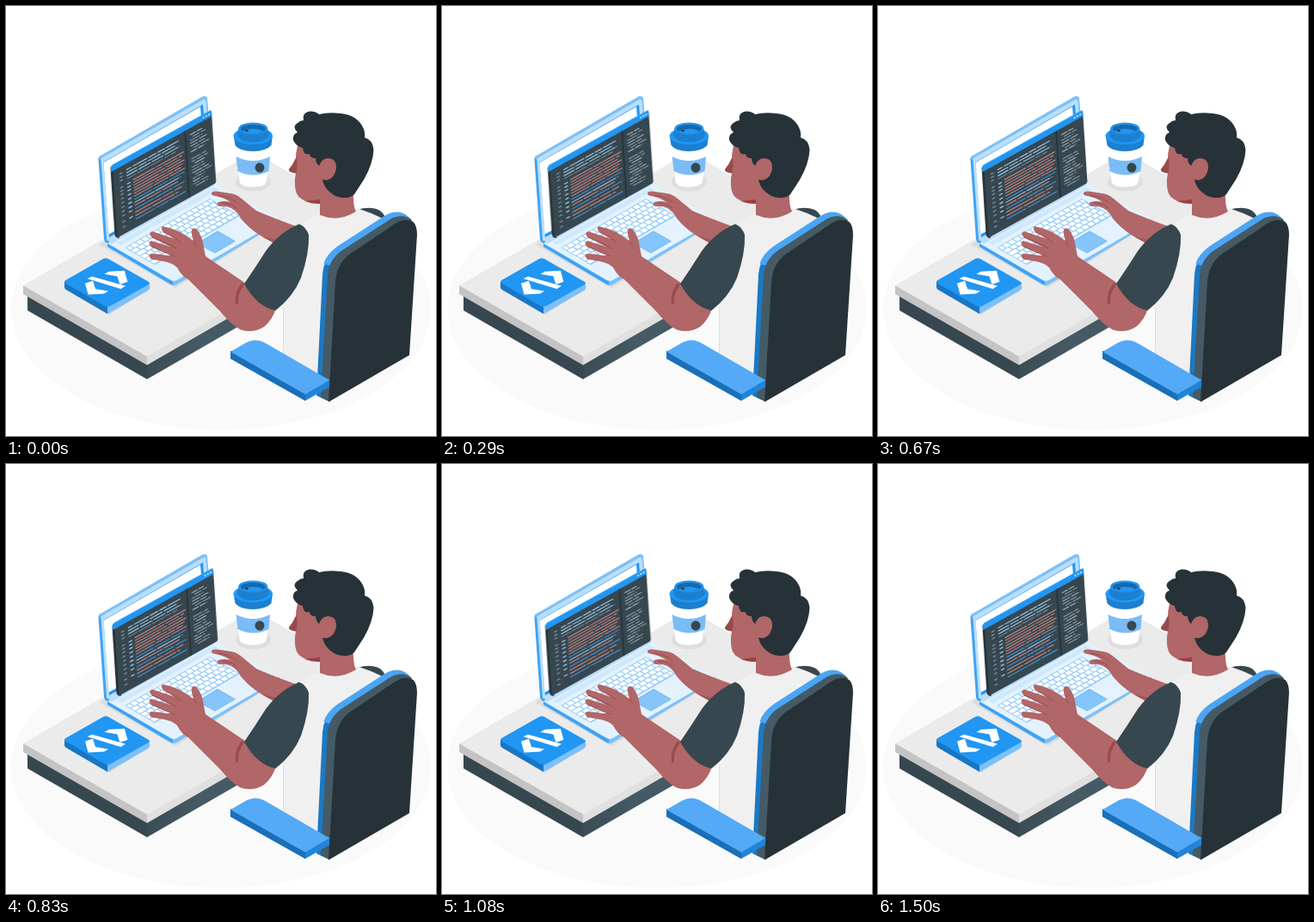
These frames come from a looping animation (500x500 px, 1540 ms). An HTML page:

```html
<!DOCTYPE html>
<html lang="en">
<head>
<meta charset="utf-8">
<title>Programmer at a desk</title>
<style>
  html, body { margin: 0; width: 100%; height: 100%; overflow: hidden; background: #fff; }
  svg { display: block; width: 100vw; height: 100vh; }
  .blue { fill: #2196f3; }
  .skin { fill: #b16668; }
  .dark { fill: #263238; }
  .slate { fill: #37474f; }
  .shade { fill: none; stroke: #9a4a4d; stroke-width: .9; stroke-linecap: round; }
</style>
</head>
<body>
<svg viewBox="0 0 500 500">
  <defs>
    <linearGradient id="leg">
      <stop offset="0" stop-color="#3b4c54"/>
      <stop offset=".4" stop-color="#455a64"/>
    </linearGradient>
  </defs>

  <ellipse cx="250" cy="352" rx="244" ry="141" fill="#fafafa"/>

  <g id="desk">
    <path class="slate" d="M25 336V354L164 434V416Z"/>
    <path fill="url(#leg)" d="M164 416V434L320 344V326Z"/>
    <path fill="#ebebeb" d="M20 325 288 169.500 400 235V272L164 408Z"/>
    <path fill="#c4c4c4" d="M20 325V335L164 417.500V407.500Z"/>
    <path fill="#e0e0e0" d="M164 407.500V417.500L345 313V303Z"/>
  </g>

  <g id="tile">
    <path fill="#d9d9d9" d="M66 326 116 297 169 327 120 359Z"/>
    <path fill="#1976c4" d="M68 320V327Q68 329 70 330L118 358V348Z"/>
    <path fill="#7dc0f9" d="M118 348V358L165 331Q167 330 167 328V321Z"/>
    <path class="blue" d="M69 319 113 294Q116 292.500 119 294L165.500 320.500Q168 322 165.500 324L121 349Q118 350.500 115 349L69.500 322.500Q67 321 69 319Z"/>
    <g fill="#fff">
      <path id="chev" d="M92 322.500 101 319.500 104 329 119 331.500 114 334.500 95.500 335.500Z"/>
      <use href="#chev" transform="rotate(180 116.700 321.600)"/>
      <path d="M94.500 317 100 314.500 139 325.500 133.500 329Z"/>
    </g>
  </g>

  <g id="cup">
    <ellipse cx="287.500" cy="204.500" rx="20.500" ry="11" fill="#dedede"/>
    <path fill="#fff" d="M267 160 271.500 204Q273 210.500 287 210.500T303 204L307.500 160Z"/>
    <path fill="#7abcf7" d="M267.500 175Q287 185 307 175L305.500 192Q288 201 269.500 192Z"/>
    <ellipse class="slate" cx="295" cy="188" rx="5.500" ry="5.800"/>
    <path fill="#1c7fd0" d="M264.500 150 266.500 162Q272 169 287 169T308.500 162L310 150Z"/>
    <ellipse class="blue" cx="287.300" cy="151" rx="22.700" ry="10"/>
    <path fill="#1c7fd0" d="M270.500 142 269 151Q273 158.500 287 158.500T306 151L304 142Z"/>
    <ellipse class="blue" cx="287.300" cy="142.500" rx="17" ry="7"/>
    <ellipse fill="#1769ad" cx="287.300" cy="143" rx="14.500" ry="5.300"/>
    <path class="blue" d="M275 145.500Q287 140 300 145.500 294 148.500 287 148.500T275 145.500Z"/>
    <ellipse class="dark" cx="280" cy="145" rx="2" ry=".9"/>
  </g>

  <g id="laptop">
    <path fill="#dcdcdc" d="M108 277 130 265 318 252 197 328Z"/>
    <path fill="#3fa3f4" d="M118 275V280L191 323.500Q195 325.500 199 323.500V316Z"/>
    <path fill="#7cc0f8" d="M194 318V324.500Q197 325 200 323L316 253Q318 252 318 248Z"/>
    <path fill="#e3f2fd" d="M118 276 243 206 316 247.500Q318 249 316 250.500L199 318.500Q195 321 191 318.500Z"/>
    <path fill="#3fa3f4" d="M107.500 179Q107 175.500 110 174L114 178 122 272 119 275.500Q115 276 114 271Z"/>
    <path fill="#7cc0f8" d="M108 177Q108 175 110 174L228 105.500Q232 103.500 234 107L242 207 237 205 228 113 112 181Z"/>
    <path fill="#bbdefb" d="M110.500 179Q110.500 177 112.500 176L229 109Q232 107.500 232.500 111L241 206 120 273Q117.500 274 117 271Z"/>
    <path class="blue" d="M113.500 181.500 229 114.500 236 204 120 269Z"/>
    <path fill="#fff" d="M113.500 182 226 117 233 203 119.500 265.500Z"/>
    <path fill="#bbdefb" d="M119.500 272.500 238 206 243 208 122 277Z"/>
    <path fill="#cfe8fc" d="M129 275 242 210.500 247 213.500 134 278Z"/>
    <path fill="#5fb0f5" d="M246 261.500 267 273.500 243 287.500 222 276Z"/>
    <path fill="#86c5f9" d="M246 262.500 266 273.500 243 287 223 276Z"/>
    <g id="keys" transform="matrix(.866 -.5 .866 .5 140 281)">
      <rect x="-1" y="-1" width="114" height="40" rx="1" fill="#90caf9"/>
    </g>
  </g>

  <g id="win">
    <path class="dark" d="M121.500 188 125 184 132 269.500Q128 270.500 126.500 266Z"/>
    <g id="pane" transform="matrix(1 -.556 .065 .994 124 186)">
      <rect class="slate" width="115" height="84" rx="1.500"/>
      <path class="blue" d="M-2.300 2Q-2.300-1.500 1-1.500H113Q115-1.500 115 1V6H-2Z"/>
      <path fill="#64b5f6" d="M-1.500-.8Q0-1.700 1-1.700H114V-.7H0Z" opacity=".6"/>
      <path class="dark" d="M83 6H84.500V84H83Z"/>
      <g fill="#fff">
        <circle cx="105.500" cy="2.400" r=".9"/><circle cx="108.700" cy="2.400" r=".9"/><circle cx="111.900" cy="2.400" r=".9"/>
      </g>
    </g>
  </g>

  <g id="farArm">
    <path class="skin" d="M239 217.500Q240 215 245 215.500L262 218Q268 219 274 224L291 238Q312 247 337 256L320 280Q306 273 296 267 283 259 273 247 269 239 262 235 256 232 248 233 244 231 247 228 254 226 261 228 254 223 244 221 238 220 239 217.500Z"/>
    <path class="shade" d="M247 220Q260 222 268 228M251 229Q262 230 268 235"/>
    <path fill="#9a4a4d" opacity=".6" d="M296 267Q306 273 320 280L324 274Q308 271 296 267Z"/>
  </g>

  <g id="body">
    <path class="slate" d="M408 237Q424 232 435 238 442 243 444 256L420 262Z"/>
    <path fill="#f0f0f0" d="M365 241Q352 248 341 254L322 352V420L365 450 440 300V248Q424 240 408 235Q388 252 365 241Z"/>
    <path fill="none" stroke="#dedede" d="M322.500 350V406"/>
    <path class="skin" d="M365 222V243Q386 252 407 239 403 232 404 212Z"/>
    <path class="skin" d="M342 155Q337 166 337 177 334 184 329 190 328 193 337 194.500 335 204 336.500 213 338 224 350 227 361 229 370 225L392 210 390 160Z"/>
    <path fill="#9a3f43" d="M346 226.500Q357 230.500 365 230V224.500Q357 226.500 346 226.500Z"/>
    <path fill="#9a4a4d" d="M337.500 176Q334 184 329 190 328 193 337 194.500 340 186 337.500 176Z"/>
    <path class="dark" d="M346 133Q344 124 353 122.500 360 122 364 126 374 123 390 125 408 127 415 141Q418 147 417 153 426 155 427.500 167 427 183 416 202L405 219Q399 225 386 222 371 216 368 202L384 190 378 178 366 187Q360 184 360 177 353 177 353 172 346 174 345 165 337 163 334 156 333 149 339 147 332 140 339 136 342 133 346 133Z"/>
    <path class="skin" d="M364 188Q365 178 374 177 384 177 384 188 383 200 373 202.500 365 203 364 196Z"/>
  </g>

  <g id="nearArm">
    <path class="skin" d="M232 291 278 322 314 352Q309 366 300 373 288 381 273 376.500 263 372 249 355L212 318Q204 314 199 304 194 299 184 297L169 294.500Q165 291 168 288 178 288 187 290L193 290 169 280Q164 275 169 273L191 280 169 268.500Q165 264 170 262L197 271 183 262.500Q179 259 182 256.500 187 256 203 263L218 273Q215 265 216 260 219 256 223 261 229 270 230 281Z"/>
    <path class="shade" d="M183 263Q196 269 203 275M170 269Q188 276 198 282M170 280Q184 287 196 291M218 273Q220 277 222 279"/>
    <path fill="#9a4a4d" d="M274 322Q265 333 267 347 269 348 270 345 269 334 277 324Z"/>
    <path class="slate" d="M341 253.500Q349 257 352 266 353 287 343 316 334 338 313.500 354 292 350 277 323 290 304 302 285 318 263 341 253.500Z"/>
  </g>

  <g id="chair">
    <path fill="#1c79c4" d="M361 453 368 312Q369 295 383 283L440 248 470 250 400 330 376 460Z"/>
    <path fill="#4aa5f5" d="M369.500 300Q372 289 386 279L441 243.500Q456 235 468 245L474 252 460 256 392 292 378 302Z"/>
    <path fill="#455a64" d="M366 455 374 313Q375 296 389.500 285L446 248.500Q461 240 472 249L440 300 376 460Z"/>
    <path class="dark" d="M375 460.500 383 322Q384 301 399 289L451 254Q464 245 474 251.500 478 256 478 266L469 406Z"/>
  </g>

  <g id="armrest">
    <path fill="#2184d8" d="M261 401V410L348 459 376 443V434Z"/>
    <path fill="#1a6fb8" d="M261 401V410L348 459V449Z"/>
    <path fill="#54aaf6" d="M261 402 280 391Q290 386 300 391L376 435 348 451.500Z"/>
  </g>
</svg>

<script>
const $ = id => document.getElementById(id);

function rect(parent, x, y, width, height, fill, rx = 0) {
  const r = document.createElementNS('http://www.w3.org/2000/svg', 'rect');
  for (const [k, v] of Object.entries({ x, y, width, height, fill, rx })) r.setAttribute(k, v);
  parent.append(r);
}

// Keyboard: six staggered rows, the front one with a space bar
for (let row = 0; row < 6; row++) {
  const y = row * 6.4, lead = row === 5 ? 7 : 4 + (row * 3) % 7;
  rect($('keys'), 0, y, lead, 5.2, '#fff', .6);
  for (let x = lead + 1.3; x < 112;) {
    const space = row === 5 && x > 28 && x < 36;
    const w = Math.min(space ? 40 : 6.1, 112 - x);
    if (w > 1) rect($('keys'), x, y, w, 5.2, '#fff', .6);
    x += w + 1.3;
  }
}

// Code: a line is cut into words by a seeded generator
let seed = 7;
const rnd = () => (seed = seed * 16807 % 2147483647) / 2147483647;
function line(x, end, y, color, word = 12) {
  while (x < end) {
    const w = Math.min(word * (.5 + rnd()), end - x);
    rect($('pane'), x, y, w, 1.1, color);
    x += w + 1.3;
  }
}
const pale = '#a9d3f5', red = '#d98a86', blue = '#3d9ae8', gray = '#78909c';
[12.5, 16, 19.5, 23].forEach((y, i) => line(15, 77 - i % 2 * 5, y, i < 3 ? pale : gray));
for (let i = 0; i < 7; i++) line(22, 81 - i % 3 * 2, 28 + i * 3.2, red, 26);
[[51, blue], [54.5, pale], [58, red], [62, blue], [66, red], [70, red], [74, blue]]
  .forEach(([y, c], i) => line(22, 80 - i % 3 * 4, y, c, 22));
[13, 17, 21, 29, 33, 37, 42, 47, 52, 57, 62, 69, 75].forEach((y, i) => {
  rect($('pane'), 7, y, 3.5, 1.5, gray);
  if (i > 2 && i < 12) rect($('pane'), 15, y, 4, 1.3, pale);
});
for (let i = 0; i < 18; i++) {
  const y = 13 + i * 3.3 + (i > 6 ? 5 : 0), x = 89 + (i % 4 === 1 ? 3 : 0);
  line(x, x + 12 + rnd() * 8, y, i % 3 ? '#90a4ae' : '#b0bec5', 8);
}

// The code window shakes sideways at a constant speed between turns
const shake = $('win').animate(
  [0, -1, 2, -4, 4, -4, 4, -4, 2, -1, 0].map(x => ({ transform: `translateX(${x}px)` })),
  { duration: 1500, iterations: Infinity });
shake.pause();

// Poses advance 24 times a second; the shake is already under way when the loop begins
const LOOP = 1540, FPS = 24, LEAD = 26;
function tick() {
  const t = performance.now() % LOOP;
  const step = Math.min(36, Math.floor((t + 5) * FPS / 1000));
  shake.currentTime = step * 1000 / FPS + LEAD;
  requestAnimationFrame(tick);
}
tick();
</script>
</body>
</html>
```
